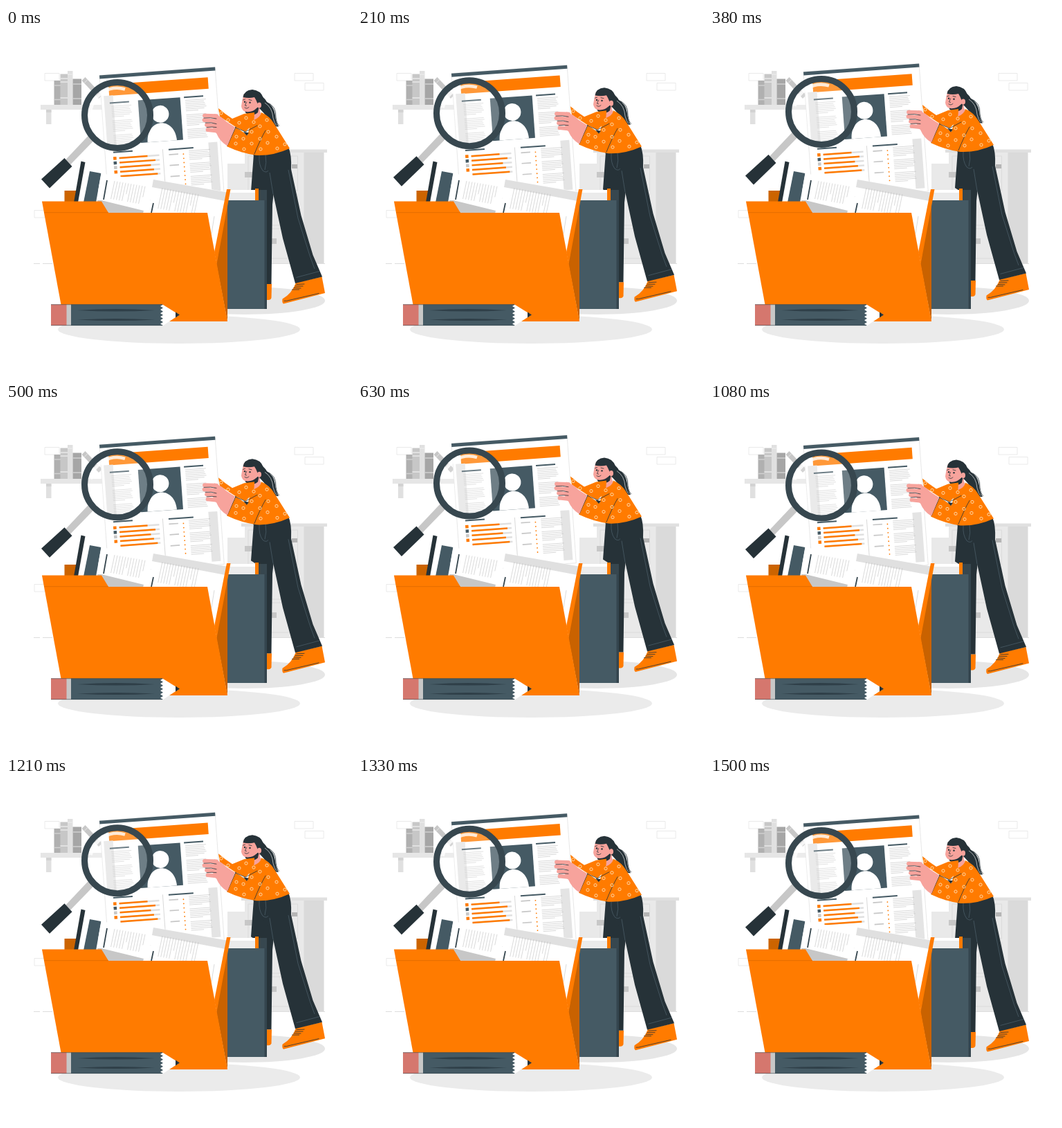
Write an HTML page that moves like this. It is 500 px wide and 500 px high and loops after 1540 ms.

```html
<!DOCTYPE html>
<html lang="en">
<head>
<meta charset="utf-8">
<title>Folder search</title>
<style>
html, body { margin: 0; width: 100%; height: 100%; overflow: hidden; background: #fff; }
svg { display: block; width: 100vw; height: 100vh; }
.o { fill: #ff7b00; }
.b { fill: #455a64; }
.d { fill: #263238; }
.w { fill: #fff; }
.skin { fill: #f7a39c; }
.g1 { fill: #ebebeb; }
.g2 { fill: #e0e0e0; }
.g3 { fill: #c7c7c7; }
.g4 { fill: #a6a6a6; }
.ln { fill: none; stroke: #263238; stroke-width: .8; stroke-linecap: round; stroke-linejoin: round; }
.seam { fill: none; stroke: #566b76; stroke-width: .6; }
.brick { fill: none; stroke: #e8e8e8; stroke-width: .9; }
.txt { fill: none; stroke: #b4b4b4; stroke-width: .5; }
</style>
</head>
<body>
<svg viewBox="0 0 500 500" xmlns="http://www.w3.org/2000/svg">
  <g id="room">
    <path class="brick" d="M56 65.500h21v10.500h-21zM417 65.500h27v10.500h-27zM432 79.500h27v10.500h-27zM41 263.500h15v10.500h-15z"/>
    <path d="M40 340.500h9M53 340.500h14M377 340.500h84" stroke="#d5d5d5" stroke-width=".8"/>
    <path fill="#e6e6e6" d="M50 111h90v7H50z"/>
    <path class="g2" d="M58 118h7.500v21H58z"/>
    <path fill="#d2d2d2" d="M58 118h7.500v4H58z"/>
    <path fill="#b0b0b0" d="M69.500 76H79v35h-9.500z"/>
    <path class="g3" d="M78.500 66.500H89V111H78.500z"/>
    <path class="g2" d="M89 62h7.500v49H89z"/>
    <path class="g4" d="M96.500 73.500H109V111H96.500z"/>
    <path d="M69.500 83H79M69.500 103.500H79M96.500 81H109M96.500 102H109" stroke="#d0d0d0" stroke-width="1.600"/>
    <path d="M78.500 73H89M78.500 78H89M78.500 101H89M89 67h7.500" stroke="#e9e9e9" stroke-width="1.400"/>
    <path class="g3" d="M109.500 76l5-5L139 97l-5 5z"/>
    <path d="M113 79.500l5-5M129 96l5-5" stroke="#e9e9e9"/>
    <path fill="#e9e9e9" d="M320 196h40v144h-40zM345 180h86v160h-86z"/>
    <path fill="#dadada" d="M430.500 180H459.500v160H430.500z"/>
    <path class="g2" d="M340 175.500H464v4.500H340z"/>
    <path fill="none" stroke="#dadada" stroke-width=".9" d="M350 185h71.500v50H350zM350 240h71.500v45H350zM350 290h71.500v43H350z"/>
    <path class="g3" d="M345 208h13v8h-13zM384 304h7v8h-7z"/>
    <path fill="#b5b5b5" d="M413 197h8v6h-8z"/>
    <ellipse fill="#e6e6e6" cx="345" cy="394" rx="116" ry="20"/>
    <ellipse class="g1" cx="250" cy="435.500" rx="175" ry="20.500"/>
  </g>

  <g id="lift">
    <g id="page" transform="translate(135 68.500) rotate(-4.1)">
      <path class="w" stroke="#dedede" stroke-width=".7" d="M0 0h167.500v185H0z"/>
      <path class="b" d="M0 0h167.500v5H0z"/>
      <path class="o" d="M12 14h144v16.500H12z"/>
      <path fill="#e4e4e4" d="M4 30h13.500v76H4zM150 108h13v72h-13z"/>
      <path class="b" d="M53 40h61v61.500H53z"/>
      <circle class="w" cx="83.700" cy="62" r="12.500"/>
      <path class="w" d="M62.500 101.500C63 66 104 66 105 101.500z"/>
      <path class="b" d="M12 40h28v2H12zM119.500 39.500h28v2h-28zM12 111.500h28v2H12zM92 113h36v2H92z"/>
      <path d="M83.500 113v64" stroke="#d0d0d0" stroke-width=".8"/>
      <path d="M92 121.500h13.500M92 137h13.500M92 153h13.500" stroke="#c7c7c7" stroke-width="1.700"/>
    </g>

    <g id="lens">
      <path class="g3" d="M120 154.500l8 7-35 36-7-7z"/>
      <path class="d" d="M84.500 188L95.500 200 63 231.500 51 218.500z"/>
      <circle class="w" cx="161" cy="126" r="45" opacity=".22"/>
      <path d="M122.500 118A39 39 0 0 1 172 88.500" fill="none" stroke="#fff" stroke-width="4.500" opacity=".8"/>
      <circle cx="161" cy="126" r="47.500" fill="none" stroke="#37474f" stroke-width="9"/>
    </g>

    <g id="woman">
      <path class="o" d="M376 370h8l-.5 20q-1 3-4 3h-4z"/>
      <path class="d" d="M358 182L354 236 376 250V370H383.500L385 255 392 190z"/>
      <path class="o" d="M419 368L456.500 359.500 461 383 401 398.500Q398.500 397 399.500 391.500 413 384 419 368z"/>
      <path class="ln" d="M402 394.500Q405 395 411 393L452 383.500"/>
      <path class="ln" stroke-width="1.400" d="M420 370.500l11-.5M418 373l11 0M416 375.500l10 .5M413.500 378l10 0"/>
      <path class="d" d="M357 182L408 172Q413 183 412 204L426.500 271 443.500 328 457 359.500 418 369 400 304 384 230Q374 212 366 205z"/>
      <path class="seam" d="M366 184Q365 198 371 206 376 210 379 206M375 183Q377 195 374 205M381 209L386 240M408 205L422 275 439 329 446 348M419.500 360.500L453 351.500"/>

      <path class="d" d="M366 96Q375 102 377 107 387 112 389 126 390 137 394 142.500 387 143 382 138 377 127 368 118z"/>
      <path class="ln" d="M376 107Q391 112 390 129 391 138 394.500 141"/>
      <path d="M374 108Q385 115 386 130 388 138 391 141" fill="none" stroke="#fff" stroke-width=".6"/>
      <path class="skin" d="M358 119l9-6q-1 8 2 11-3 7-9 11l-4-1q4-6 2-15z"/>
      <path class="d" d="M345 119Q357 122 366 112L364 122Q356 129 346.500 123z"/>
      <path class="skin" d="M344 95Q341 104 340 113 341 120 347 121 356 122.500 363 115L368 108 362 95z"/>
      <path class="d" d="M342.500 100Q344 90 356 89 368 90 372 101 373 112 367 118 365 112 363 108 361 103 359 100 351 102 342.500 100z"/>
      <ellipse class="skin" cx="366" cy="111.500" rx="3" ry="4"/>
      <circle class="d" cx="345" cy="106.800" r="1.200"/>
      <circle class="d" cx="352.500" cy="107.800" r="1.200"/>
      <path class="ln" d="M342.500 104l3-1M351 103.500l4 1M347.500 107l-2 5 2 .5M345 115q3 2.500 6-.5"/>

      <path class="o" d="M307 116Q316 124 327 131L344 124 359 122Q359 130 358 133 368 129 369 122 381 127 388 139L410 174Q386 185 362 184 340 181 319 171L332 143 309 128z"/>
      <path class="w" d="M332 143l14 7 6-6-3 11z"/>
      <path class="d" d="M343 150l8 1.500-3 4z"/>
      <path class="ln" d="M331 143.500l15 6.500 17-9M375 148Q367 162 359 182M332 143L320 170"/>
      <g id="dots" fill="none" stroke="#ffe0b8" stroke-width=".9"></g>

      <path class="skin" d="M301 124Q312 128 318 135L331 143.500 320 170.500Q309 164 304 152L299 148z"/>
      <path d="M287 126.700l17 .5M286.500 133l18 1.500M290 140l15 1.500M291.500 147l14 1.500" fill="none" stroke="#f7a39c" stroke-width="5.800" stroke-linecap="round"/>
      <path class="ln" d="M286 130q10-1 18 1M288 137q9-1 16 1.500M290 143.500q8-1 14 0"/>
    </g>
  </g>

  <g id="front">
    <path fill="#cc6400" d="M84.500 235H102v17H84.500z"/>
    <path class="d" d="M108.500 192.500L114.500 194 104 252H98z"/>
    <path class="b" d="M121 207L137.500 210 130 252H112z"/>
    <path class="w" d="M137.500 210L212 223 205 268H133V236z"/>
    <path class="g3" d="M132 249h6L199 264l-1 4h-60z"/>
    <path class="w" d="M214 219L319 237 303 328 288 268H205z"/>
    <path class="g2" d="M213 219L319 237.500 317 250 211 230z"/>
    <path d="M146 220l-5 28M213 253l-3 14" stroke="#37474f" stroke-width="1.800"/>
    <g id="notes" class="txt"></g>

    <path fill="#37474f" d="M365 234h12v171h-12z"/>
    <path class="w" d="M321 234h39v15h-39z"/>
    <path class="g1" d="M321 238h39v11h-39z"/>
    <path class="o" d="M360 232h5v17h-5z"/>
    <path class="b" d="M320 249h54v157h-54z"/>
    <path fill="#34454e" d="M373.500 249H377V406h-3.500z"/>
    <path fill="#c96200" d="M320 246V424L304 341z"/>
    <path class="o" d="M319 233h5.500L304.500 341l-3.500-17z"/>

    <path class="o" d="M52 250.500h86L148 267H55z"/>
    <path class="o" d="M55 267H291L320 424H84z"/>
    <path d="M55 266.700H148" stroke="#d96800" stroke-width=".7"/>

    <path fill="#d5776e" d="M65 399.500h23V430H65z"/>
    <path class="g3" d="M87.500 399.500H94V430h-6.500z"/>
    <path class="w" d="M223 400h4L250.500 414.500 227 430h-4z"/>
    <path id="wood" class="b"/>
    <path d="M103 408q56-4 112 0-56 3-112 0zM103 421.500q56-3 112 0-56 3-112 0z" fill="#2f3f48"/>
    <path d="M65 429.700H226M65 399.700H226" stroke="#37474f" stroke-width=".6"/>
    <path class="d" d="M245 410.500L251 414.500 245 418.500z"/>
  </g>
</svg>
<script>
const LOOP = 1540, RISE = 1500, HEIGHT = 10;
const $ = id => document.getElementById(id);
const add = (id, html) => $(id).insertAdjacentHTML('beforeend', html);

// Ragged rows of small print, with a gap after each paragraph
function rows(u, v, width, count, per) {
  let d = '';
  for (let i = 0; i < count; i++) {
    const y = v + i * 2.5 + Math.floor(i / per) * 3.5;
    const w = i % per === per - 1 ? width * .6 : width - (i * 7 % 4);
    d += `M${u} ${y}h${w}`;
  }
  return `<path class="txt" d="${d}"/>`;
}

// Slanted strokes for the sheets lying on their side
function columns(x, y, count, length) {
  let d = '';
  for (let i = 0; i < count; i++) {
    const k = i % 6 === 5 ? .6 : 1;
    d += `M${x + i * 4} ${y + i * .7}l${-length * .21 * k} ${length * k}`;
  }
  return `<path d="${d}"/>`;
}

add('page', rows(14, 46, 29, 20, 7) + rows(121, 45, 30, 20, 7) + rows(121, 118, 31, 18, 6));

const skills = [41, 52, 45, 49, 54];
const marks = ['#ff7b00', '#455a64', '#c7c7c7', '#ff7b00'];
skills.forEach((w, i) => {
  const y = 119 + i * 6.6;
  add('page', `<path class="g2" d="M20 ${y + 1}h58v2.500h-58z"/>
    <path class="o" d="M20 ${y + 1}h${w}v2.500h${-w}z"/>`);
});
marks.forEach((color, i) => {
  add('page', `<path fill="${color}" d="M11.500 ${119 + i * 6.6}h4.500v4.500h-4.500z"/>`);
});
for (let i = 0; i < 8; i++) add('page', `<circle class="o" cx="113" cy="${122 + i * 6.2}" r=".9"/>`);

add('notes', columns(157, 221, 12, 26) + columns(226, 231, 14, 30) + '<path d="M301 272l-4 25"/>');

const dots = [[311, 123], [321, 133], [327, 143], [337, 137], [347, 130], [358, 136], [367, 142],
  [377, 133], [355, 150], [367, 160], [355, 167], [343, 160], [332, 167], [333, 157], [379, 150],
  [391, 157], [378, 166], [392, 174], [344, 175], [368, 175], [403, 168]];
add('dots', dots.map(([x, y]) => `<circle cx="${x}" cy="${y}" r="2.100"/>`).join(''));

let edge = 'M94 399.500H227';
for (let i = 0; i < 6; i++) edge += 'l-4 2.540 4 2.540';
$('wood').setAttribute('d', edge + 'H94z');

function draw(now) {
  const t = Math.min(now % LOOP, RISE);
  const y = -HEIGHT * (1 - Math.abs(2 * t / RISE - 1));
  $('lift').setAttribute('transform', `translate(0 ${y.toFixed(3)})`);
}

let start;
function tick(now) {
  start ??= now;
  draw(now - start);
  requestAnimationFrame(tick);
}
draw(0);
requestAnimationFrame(tick);
</script>
</body>
</html>
```
